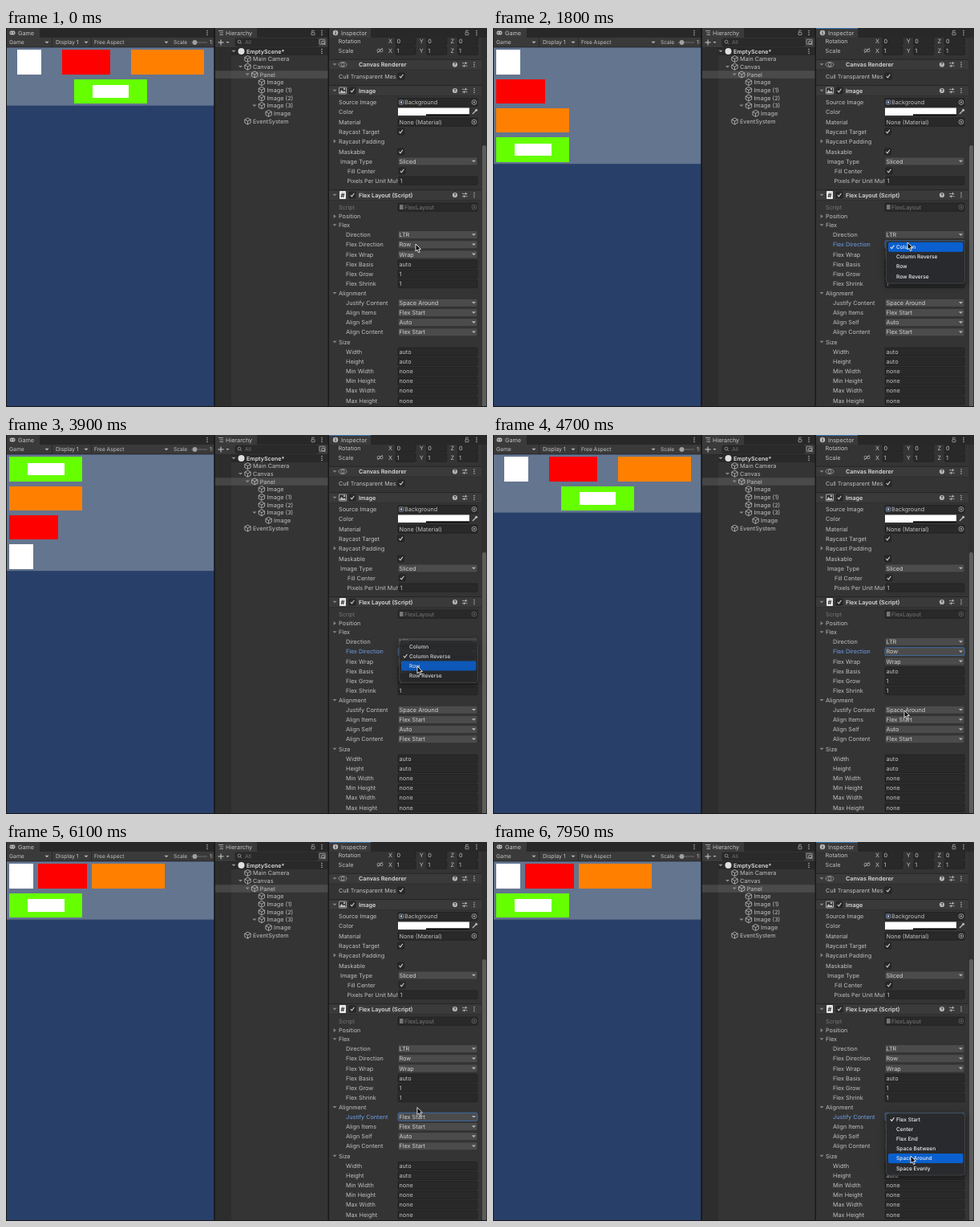
These frames come from a looping animation (600 by 472 pixels, 8 s). An HTML page with a canvas:

```html
<!DOCTYPE html>
<html lang="en">
<head>
<meta charset="utf-8">
<title>Flex layout inspector</title>
<style>
html, body { margin: 0; width: 100%; height: 100%; overflow: hidden; background: #191919; }
canvas { display: block; }
</style>
</head>
<body>
<canvas id="stage" width="600" height="472"></canvas>
<script>
const LOOP = 8000, W = 600, H = 472;
const ROW = 12.15, FIELD_X = 489, FIELD_W = 99;
const FONT = 'Inter, "Open Sans", sans-serif';
const TEXT = '#c2c2c2', BLUE = '#6f9fe8', PANEL = '#343434', HEAD = '#3a3a3a', DARK = '#282828';
const DIRS = ['Column', 'Column Reverse', 'Row', 'Row Reverse'];
const JUSTIFY = ['Flex Start', 'Center', 'Flex End', 'Space Between', 'Space Around', 'Space Evenly'];
const DIR_Y = 269.7, JUST_Y = 342.3;

// Cursor tip: time, x, y
const path = [
  [0, 511, 269], [200, 511, 269], [650, 514, 252], [1000, 514, 252], [1550, 517, 267],
  [1800, 517, 267], [2450, 517, 285], [2800, 516, 284], [3150, 515, 270], [3300, 515, 270],
  [3550, 513, 288], [3900, 513, 288], [4500, 504, 357], [4700, 513, 343], [4950, 513, 343],
  [5300, 521, 309], [5700, 521, 309], [6200, 512, 333], [6300, 512, 333], [6600, 505, 341],
  [6820, 505, 341], [7100, 520, 369], [7950, 521, 391], [8000, 521, 391]
];

// Each menu visit: opening click, choosing click, which list, old and new choice
const visits = [
  { press: 50, pick: 800, list: DIRS, from: 2, to: 0 },
  { press: 1650, pick: 2500, list: DIRS, from: 0, to: 1 },
  { press: 3200, pick: 3700, list: DIRS, from: 1, to: 2 },
  { press: 4850, pick: 5450, list: JUSTIFY, from: 4, to: 0 },
  { press: 6700, pick: Infinity, list: JUSTIFY, from: 0, to: 4 }
];
const OPEN_DELAY = 100, COMMIT_DELAY = 250, FADE_DELAY = 190, FADE = 80, RING = 150;

const stage = document.getElementById('stage').getContext('2d');
let g = stage;

function box(x, y, w, h, fill) {
  g.fillStyle = fill;
  g.fillRect(x, y, w, h);
}

// Rectangle snapped to whole pixels
function crisp(x, y, w, h, fill) {
  const l = Math.round(x), t = Math.round(y);
  box(l, t, Math.round(x + w) - l, Math.round(y + h) - t, fill);
}

function round(x, y, w, h, r, fill, line) {
  g.beginPath();
  g.roundRect(x, y, w, h, r);
  if (fill) { g.fillStyle = fill; g.fill(); }
  if (line) { g.strokeStyle = line; g.lineWidth = 0.8; g.stroke(); }
}

function text(s, x, y, color = TEXT, size = 7.25, weight = 400) {
  g.font = `${weight} ${size}px ${FONT}`;
  g.fillStyle = color;
  g.fillText(s, x, y + size * 0.36);
}

function poly(points, fill, line, width = 0.8) {
  g.beginPath();
  points.forEach(([x, y], i) => i ? g.lineTo(x, y) : g.moveTo(x, y));
  if (fill) { g.closePath(); g.fillStyle = fill; g.fill(); }
  if (line) { g.strokeStyle = line; g.lineWidth = width; g.stroke(); }
}

function circle(x, y, r, fill, line, width = 0.8) {
  g.beginPath();
  g.arc(x, y, r, 0, 7);
  if (fill) { g.fillStyle = fill; g.fill(); }
  if (line) { g.strokeStyle = line; g.lineWidth = width; g.stroke(); }
}

const down = (x, y, c = '#b5b5b5', r = 2.6) => poly([[x - r, y - r / 2], [x + r, y - r / 2], [x, y + r / 2]], c);
const right = (x, y, c = '#858585') => poly([[x - 1.4, y - 2.6], [x + 1.8, y], [x - 1.4, y + 2.6]], c);
const dots = (x, y) => [-2.5, 0, 2.5].forEach(d => circle(x, y + d, 0.75, '#c0c0c0'));
const tick = (x, y, c) => poly([[x - 2.2, y], [x - 0.6, y + 1.9], [x + 2.4, y - 2.2]], null, c, 1.1);

function lock(x, y) {
  round(x - 2, y - 0.3, 4, 3, 0.3, null, '#a8a8a8');
  poly([[x - 1.3, y - 0.5], [x - 1.3, y - 2.8], [x + 1.3, y - 2.8], [x + 1.3, y - 1.7]], null, '#a8a8a8');
}

function cube(x, y) {
  const c = '#c0c0c0';
  poly([[x, y - 4], [x + 3.7, y - 2], [x + 3.7, y + 2], [x, y + 4], [x - 3.7, y + 2], [x - 3.7, y - 2], [x, y - 4]], null, c);
  poly([[x - 3.7, y - 2], [x, y], [x + 3.7, y - 2]], null, c);
  poly([[x, y], [x, y + 4]], null, c);
}

function input(x, y, w, s, color = TEXT) {
  round(x, y - 5, w, 10.2, 1.2, '#292929', '#212121');
  text(s, x + 1.5, y, color);
}

function dropdown(y, s, focus) {
  round(FIELD_X, y - 5, FIELD_W, 10, 1.5, '#4b4b4b', focus ? '#3f78bd' : '#303030');
  text(s, FIELD_X + 1.5, y, '#d2d2d2');
  down(583.5, y);
}

function check(x, y) {
  round(x - 4, y - 4, 8, 8, 1, '#292929', '#202020');
  tick(x, y, '#d0d0d0');
}

function picker(y, c = '#b0b0b0') {
  circle(584, y, 2.9, null, c);
  circle(584, y, 1.1, c);
}

function clipped(s, x, y, edge) {
  g.save();
  g.beginPath();
  g.rect(x, y - 6, edge - x, 12);
  g.clip();
  text(s, x, y, TEXT, 7.1);
  g.restore();
}

function header(y, title) {
  box(403, y - 6.5, 190, 13, HEAD);
  box(403, y - 6.7, 190, 0.8, '#202020');
  box(403, y + 6.2, 190, 0.7, '#2c2c2c');
  down(410, y, '#858585');
  text(title, 440, y, '#dadada', 7.2, 600);
  circle(560, y, 3.1, '#b8b8b8');
  text('?', 558.5, y, HEAD, 5.5, 700);
  for (const [d, k] of [[-1.7, 1], [1.7, -1]]) {
    box(569, y + d - 0.4, 6.5, 0.8, '#b8b8b8');
    box(572 + k, y + d - 1.5, 1, 3, '#b8b8b8');
  }
  dots(584, y);
}

function drawGameFrame() {
  box(1, 0, 259, 12, DARK);
  box(1, 0, 41, 12, HEAD);
  round(4.5, 3.5, 7, 5, 2.2, '#b8b8b8');
  circle(6.5, 6, 0.8, HEAD);
  circle(9.5, 6, 0.8, HEAD);
  text('Game', 15, 6);
  dots(251, 6);
  box(1, 12, 259, 12, HEAD);
  text('Game', 4, 18, TEXT, 6.8);
  text('Display 1', 62, 18, TEXT, 6.9);
  text('Free Aspect', 110, 18, TEXT, 6.6);
  text('Scale', 209, 18, TEXT, 6.6);
  [51, 100, 200].forEach(x => down(x, 18));
  [57, 106].forEach(x => box(x, 12, 0.8, 12, '#262626'));
  box(231, 17.4, 20, 1.2, '#626262');
  circle(235.5, 18, 2.9, '#a0a0a0');
  text('1:', 254, 18, TEXT, 6.8);
  box(1, 23.6, 259, 0.8, '#202020');
  box(259.2, 0, 2, H, '#191919');
}

function drawHierarchy() {
  const cx = 261;
  box(cx, 0, 141, H, PANEL);
  box(cx, 0, 141, 12, DARK);
  box(cx, 0, 52, 12, HEAD);
  [-2.4, 0, 2.4].forEach((d, i) => box(265 + (i ? 1.5 : 0), 5.6 + d, i ? 4.5 : 6, 0.8, '#b8b8b8'));
  text('Hierarchy', 274, 6);
  lock(383, 6);
  dots(394, 6);
  box(cx, 12, 141, 12, HEAD);
  box(264.5, 17.4, 7, 1.1, TEXT);
  box(267.5, 14.5, 1.1, 7, TEXT);
  down(276.5, 18, '#b5b5b5', 2);
  round(286, 13.2, 103, 9.6, 2, '#2a2a2a', '#222');
  circle(291, 17, 1.9, null, '#999');
  poly([[292.4, 18.4], [294, 20]], null, '#999');
  text('All', 298, 18, '#6e6e6e', 6.8);
  round(391, 14.2, 7, 6, 0.6, null, '#aaa');
  circle(395.5, 18, 1.9, HEAD, '#c0c0c0');
  poly([[396.8, 19.3], [398.6, 21.2]], null, '#c0c0c0');
  box(cx, 24, 141, 0.7, '#202020');
  box(cx, 24.5, 20, H - 24.5, '#2d2d2d');
  box(281, 24.5, 121, 9.4, '#292929');
  box(281, 53.2, 121, 9.6, '#4a4a4a');
  box(cx, 53.2, 20, 9.6, '#454545');
  down(284, 29, '#959595');
  circle(293.5, 29, 4, '#e0e0e0');
  text('EmptyScene*', 300, 29, '#e0e0e0', 7.1, 600);
  dots(394, 29);
  const rows = [['Main Camera', 0], ['Canvas', 0, 1], ['Panel', 1, 1], ['Image', 2], ['Image (1)', 2],
    ['Image (2)', 2], ['Image (3)', 2, 1], ['Image', 3], ['EventSystem', 0]];
  rows.forEach(([name, depth, open], i) => {
    const x = 301.5 + depth * 8.7, y = 38.5 + i * 9.7;
    if (open) down(x - 9, y, '#8a8a8a');
    cube(x, y);
    text(name, x + 6.5, y);
  });
  box(401.5, 0, 2, H, '#191919');
}

function axes(name, y, value) {
  text(name, 414.5, y);
  ['X', 'Y', 'Z'].forEach((axis, i) => {
    const x = 477 + i * 38.7;
    text(axis, x, y);
    input(x + 9, y, 25, String(value));
  });
}

function drawInspector() {
  box(403, 0, 197, H, PANEL);
  axes('Rotation', 16, 0);
  axes('Scale', 28, 1);
  circle(464.8, 28, 1.8, null, '#aaa');
  circle(468.2, 28, 1.8, null, '#aaa');
  poly([[463, 31], [470, 25]], null, '#aaa');
  box(403, 0, 197, 12, DARK);
  box(403, 0, 52, 12, HEAD);
  circle(411, 6, 3.2, '#bcbcbc');
  box(410.5, 5.2, 1.1, 3, HEAD);
  box(410.5, 3.6, 1.1, 1, HEAD);
  text('Inspector', 418, 6);
  lock(575, 6);
  dots(587, 6);

  header(45.5, 'Canvas Renderer');
  g.beginPath();
  g.ellipse(420, 45.5, 5, 3, 0, 0, 7);
  g.strokeStyle = '#aaa';
  g.stroke();
  circle(420, 45.5, 2, null, '#aaa');
  clipped('Cull Transparent Mesh', 415, 60, 487);
  check(493, 60);

  header(78, 'Image');
  round(415.5, 74, 9, 8, 0.5, PANEL, '#c0c0c0');
  poly([[416, 81], [418.5, 77], [420.5, 79.5], [422, 78], [424, 81]], '#c0c0c0');
  circle(422, 76, 0.9, '#eee');
  check(432, 78);
  text('Source Image', 415, 92.5);
  input(FIELD_X, 92.5, FIELD_W, '');
  round(490.5, 90, 5, 5, 0.5, null, '#8fa6cf');
  box(492, 91.5, 2, 2, '#d8e0f0');
  text('Background', 497, 92.5);
  picker(92.5);
  text('Color', 415, 104.5);
  box(FIELD_X, 99.5, 89, 9.5, '#fff');
  box(524, 107.4, 54, 1.7, '#000');
  poly([[582, 107], [586, 103]], null, '#bbb', 1.3);
  circle(586.6, 102.3, 1.5, '#bbb');
  text('Material', 415, 117);
  input(FIELD_X, 117, FIELD_W, 'None (Material)');
  picker(117);
  text('Raycast Target', 415, 129);
  check(492.5, 129);
  right(410, 141);
  text('Raycast Padding', 415, 141);
  text('Maskable', 415, 154);
  check(492.5, 154);
  text('Image Type', 417, 166);
  dropdown(166, 'Sliced');
  text('Fill Center', 426, 178);
  check(494, 178);
  clipped('Pixels Per Unit Multiplier', 425.5, 190, 489);
  input(490, 190, 98, '1');

  header(208, 'Flex Layout (Script)');
  round(416, 203, 8, 10, 0.8, '#e8e8e8');
  text('#', 417.4, 208, '#2c2c2c', 7.5, 700);
  check(432, 208);
  text('Script', 415, 223, '#777');
  input(FIELD_X, 223, FIELD_W, '');
  text('FlexLayout', 497, 223, '#777');
  round(491, 220, 4.5, 6, 0.5, '#777');
  picker(223, '#666');
  right(410, 234.5);
  text('Position', 415, 234.5);
  for (const [name, y] of [['Flex', 245.5], ['Alignment', 330.3], ['Size', 391]]) {
    down(410, y, '#858585');
    text(name, 415, y);
  }
  const labelled = (list, top, draw) => list.forEach(([name, value], i) => {
    const y = top + i * ROW;
    text(name, 424, y);
    draw(y, value);
  });
  const plain = (y, s) => input(FIELD_X, y, FIELD_W, s);
  labelled([['Direction', 'LTR']], 257.5, dropdown);
  labelled([['Flex Wrap', 'Wrap']], 281.9, dropdown);
  labelled([['Flex Basis', 'auto'], ['Flex Grow', '1'], ['Flex Shrink', '1']], 294.1, plain);
  labelled([['Align Items', 'Flex Start'], ['Align Self', 'Auto'], ['Align Content', 'Flex Start']], 354.5, dropdown);
  labelled([['Width', 'auto'], ['Height', 'auto'], ['Min Width', 'none'], ['Min Height', 'none'],
    ['Max Width', 'none'], ['Max Height', 'none']], 403.2, plain);

  box(593, 12, 7, H - 12, '#303030');
  round(594, 146, 5, 340, 2.5, '#5c5c5c');
  box(0, 471, W, 1, '#191919');
}

function drawGame(dir, justify) {
  const items = [[30.3, '#fff'], [60.8, '#ff0000'], [91.2, '#ff8000'], [91.2, '#66ff00']];
  const column = dir < 2, reverse = dir % 2 === 1;
  const left = 1, width = 258.8, top = 24.4, gap = 3, pitch = 36.3, tall = 30.3;
  box(1, 24.4, 258.2, 446.6, '#284069');
  box(left, top, 258.2, pitch * (column ? 4 : 2) - 0.4, '#64758f');
  const place = (item, x, y) => {
    crisp(x, y, item[0], tall, item[1]);
    if (item === items[3]) crisp(x + 22.9, y + 7.6, 45.7, 15.2, '#fff');
  };
  if (column) {
    items.forEach((item, i) => place(item, left + gap, top + gap + pitch * (reverse ? 3 - i : i)));
    return;
  }
  [items.slice(0, 3), items.slice(3)].forEach((line, n) => {
    const free = width - line.reduce((sum, item) => sum + item[0] + 2 * gap, 0);
    const pad = JUSTIFY[justify] === 'Space Around' ? free / line.length / 2 : 0;
    let x = left;
    for (const item of reverse ? line.slice().reverse() : line) {
      x += pad + gap;
      place(item, x, top + gap + pitch * n);
      x += item[0] + gap + pad;
    }
  });
}

function drawMenu(v, t, tipY) {
  const alpha = Math.min(1, 1 - (t - v.pick - FADE_DELAY) / FADE);
  if (t < v.press + OPEN_DELAY || alpha <= 0) return;
  const first = (v.list === DIRS ? DIR_Y : JUST_Y) + 3.1 - v.from * (ROW - 2.5);
  const height = (v.list.length - 1) * ROW + 16.5;
  const hover = t < v.pick ? Math.floor((tipY - first) / ROW + 0.5) : v.to;
  g.save();
  g.globalAlpha = alpha;
  g.shadowColor = 'rgba(0,0,0,.5)';
  g.shadowBlur = 9;
  g.shadowOffsetY = 2;
  round(490.5, first - 7.6, 98, height, 3.5, '#292a2d');
  g.shadowColor = 'transparent';
  round(490.5, first - 7.6, 98, height, 3.5, null, '#48494b');
  v.list.forEach((name, i) => {
    const y = first + i * ROW;
    if (i === hover) round(493, y - 6, 93.5, 12, 2, '#0a60cf');
    if (i === v.from) tick(498, y, '#eee');
    text(name, 503, y, '#eee', 6.6, 500);
  });
  g.restore();
}

function cursorAt(t) {
  const i = path.findIndex(p => p[0] > t);
  const [t0, x0, y0] = path[i - 1], [t1, x1, y1] = path[i];
  const k = (t - t0) / (t1 - t0), e = k * k * (3 - 2 * k);
  return [x0 + (x1 - x0) * e, y0 + (y1 - y0) * e];
}

function drawCursor(x, y) {
  g.save();
  g.translate(x, y);
  const arrow = [[0, 0], [0, 9], [2.1, 7.2], [3.6, 10.6], [5.2, 9.9], [3.7, 6.6], [6.5, 6.4], [0, 0]];
  poly(arrow, '#0a0a0a', '#f2f2f2', 0.9);
  g.restore();
}

function render(t) {
  let dir = 2, justify = 4, focus = null;
  for (const v of visits) {
    if (t < v.pick + COMMIT_DELAY) continue;
    focus = v.list;
    if (v.list === DIRS) dir = v.to; else justify = v.to;
  }
  const [x, y] = cursorAt(t);
  g.drawImage(base, 0, 0);
  drawGame(dir, justify);
  if (focus) box(403, 0, 52, 1, '#3a72b0');
  const property = (name, fy, list, value) => {
    text(name, 424, fy, focus === list ? BLUE : TEXT);
    dropdown(fy, list[value], focus === list);
  };
  property('Flex Direction', DIR_Y, DIRS, dir);
  property('Justify Content', JUST_Y, JUSTIFY, justify);
  visits.forEach(v => drawMenu(v, t, y));
  const clicked = at => t >= at && t < at + RING;
  if (visits.some(v => clicked(v.press) || clicked(v.pick))) {
    circle(x, y, 12.6, null, 'rgba(190,190,190,.6)', 1);
    circle(x, y, 10.4, null, 'rgba(20,20,20,.5)', 1.4);
  }
  drawCursor(x, y);
}

const base = document.createElement('canvas');
base.width = W;
base.height = H;
g = base.getContext('2d');
g.textRendering = 'geometricPrecision';
box(0, 0, W, H, '#191919');
drawGameFrame();
drawHierarchy();
drawInspector();
g = stage;
g.textRendering = 'geometricPrecision';

const start = performance.now();
function loop() {
  render((performance.now() - start) % LOOP);
  requestAnimationFrame(loop);
}
loop();
</script>
</body>
</html>
```
